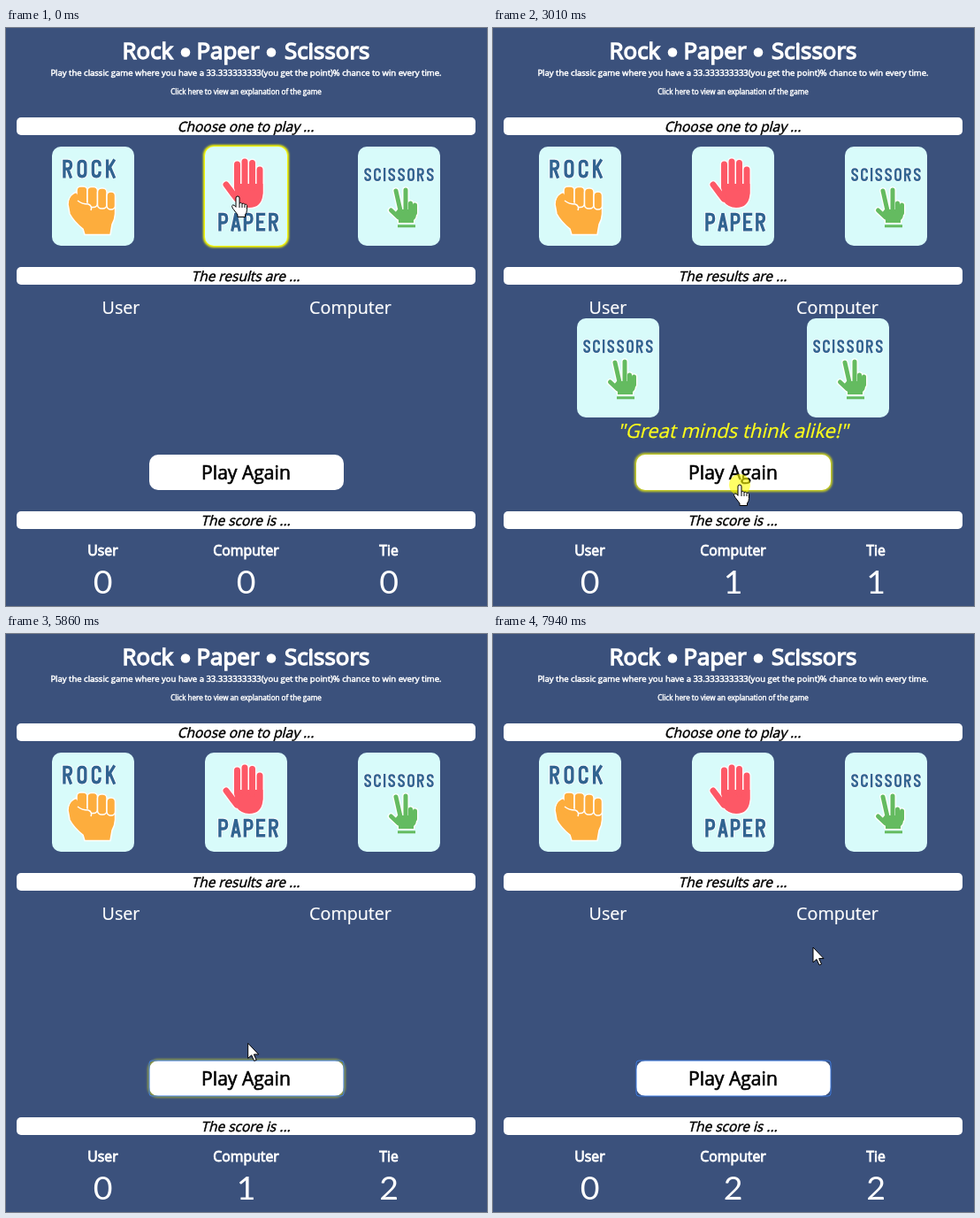
Recreate the animation shown at these times as an HTML page. Size 544 by 653 pixels, loop 8 s.

```html
<!DOCTYPE html>
<html lang="en">
<head>
<meta charset="utf-8">
<title>Rock Paper Scissors</title>
<style>
html, body { margin: 0; width: 100%; height: 100%; overflow: hidden; background: #3b517c; }
svg { display: block; font-family: "Open Sans", "Noto Sans", sans-serif; }
text { fill: #fff; text-anchor: middle; }
.left { text-anchor: start; }
.strong { stroke: #fff; stroke-width: .055em; }
.plain { stroke: #fff; stroke-width: .012em; }
.ink { fill: #000; stroke: #000; stroke-width: .03em; }
.cheer { fill: #ffff1a; stroke: #ffff1a; stroke-width: .01em; }
.digit { font: 37.5px Lato, sans-serif; }
</style>
</head>
<body>
<svg id="stage" width="544" height="653" viewBox="0 0 544 653">
  <defs>
    <filter id="soft" x="-20%" y="-20%" width="140%" height="140%"><feGaussianBlur stdDeviation=".8"/></filter>
    <filter id="halo" x="-20%" y="-20%" width="140%" height="140%"><feGaussianBlur stdDeviation="1.5"/></filter>
  </defs>
</svg>
<script>
const LOOP = 8000;
const CARD = { w: 93, h: 112 };
const stage = document.getElementById('stage');

// Condensed card lettering on a 12 x 22 grid
const glyphs = {
  R: 'M2 22V2H6Q10 2 10 6.5T6 11H2M6 11L10 22',
  O: 'M2 6Q2 2 6 2T10 6V16Q10 20 6 20T2 16Z',
  C: 'M10 8V6Q10 2 6 2T2 6V16Q2 20 6 20T10 16V14',
  K: 'M2 0V22M10.5 0L3 12M5 9L10.5 22',
  P: 'M2 22V2H6Q10 2 10 7T6 12H2',
  A: 'M1.5 22L6 1L10.5 22M3 16H9',
  E: 'M11 2H2V20H11M2 11H9',
  S: 'M10 7V6Q10 2 6 2T2 6Q2 9 6 11T10 16Q10 20 6 20T2 16V15',
  I: 'M2 0V22'
};

function lettering(word, x, y, scale, gap) {
  let pen = 0, paths = '';
  for (const letter of word) {
    paths += `<path d="${glyphs[letter]}" transform="translate(${pen} 0)"/>`;
    pen += (letter === 'I' ? 4 : 12) + gap / scale;
  }
  const layer = (color, width) => `<g stroke="${color}" stroke-width="${width}">${paths}</g>`;
  return `<g fill="none" transform="translate(${x} ${y}) scale(${scale})">${layer('#fff', 5.4)}${layer('#316491', 3.5)}</g>`;
}

// A hand made of thick round strokes over a filled palm, with a white rim
function hand(color, palm, fingers, width) {
  const layer = (tone, rim) => `<g stroke="${tone}" stroke-linecap="round" stroke-linejoin="round">
    <path d="${palm}" fill="${tone}" stroke-width="${rim}"/>
    <path d="${fingers}" fill="none" stroke-width="${width + rim}"/></g>`;
  return layer('#fff', 2.6) + layer(color, 0);
}

const knuckles = [[28, 45, 12, 22], [40, 45.5, 11.5, 23], [51.5, 47, 10.5, 23], [62, 51, 9.5, 20]]
  .map(([x, y, w, h]) => `<rect x="${x}" y="${y}" width="${w}" height="${h}" rx="4.5"/>`).join('');

const art = {
  rock: lettering('ROCK', 12, 14.5, .96, 4.7) +
    `<g fill="#fdad3d" stroke="#fff" stroke-width="1.5" stroke-linejoin="round">
      <path d="M18 65Q19 54 28 51L42 58H71.5V76Q71 83 68 88L66 99.5H37L35 93Q25 85 20 76Z"/>${knuckles}
      <path d="M19 63Q21 53 28 53Q32 62 41 64Q46 66 44 71Q40 74 34 72Z" stroke="none"/>
      <path d="M29 61Q34 65 41 65Q46 67 44 72" fill="none"/></g>`,
  paper: hand('#fd5866', 'M33 42H65.5V54Q64 69 50 69Q41 69 35 61Z',
    'M36.5 20V46M45 17V46M53.5 18.5V46M62 26V52M24 43L36 59', 7) +
    lettering('PAPER', 15, 74.5, .96, 2.7),
  scissors: lettering('SCISSORS', 7, 24, .69, 2.6) +
    hand('#64bb60', 'M45 71H66V76Q66 81 63 83V86H46V82L41 76Z',
      'M43 50L48 72M54 49V72M59.5 64V72M64.5 66V75M37.5 72L46 80', 5) +
    '<rect x="45" y="88.3" width="20" height="3" fill="#64bb60"/>'
};

const add = (markup, parent = stage) => {
  parent.insertAdjacentHTML('beforeend', markup);
  return parent.lastElementChild;
};
const text = (content, x, y, size, cls) =>
  add(`<text x="${x}" y="${y}" font-size="${size}" class="${cls}">${content}</text>`);
const slanted = (content, y, size, cls) =>
  add(`<text transform="translate(271 ${y}) skewX(-14)" font-size="${size}" class="${cls}">${content}</text>`);
const glow = (x, y, w, h, spread, filter) =>
  add(`<rect x="${x - spread}" y="${y - spread}" width="${w + 2 * spread}" height="${h + 2 * spread}"
    rx="${10 + spread}" fill="#ff0" filter="url(#${filter})" opacity="0"/>`);
const show = (node, on) => node.setAttribute('visibility', on ? 'visible' : 'hidden');

function card(x, y, kinds) {
  const group = add(`<g transform="translate(${x} ${y})"><rect width="${CARD.w}" height="${CARD.h}" rx="10" fill="#d8fbfa"/></g>`);
  const faces = {};
  for (const kind of kinds) faces[kind] = add(`<g role="img" aria-label="${kind}">${art[kind]}</g>`, group);
  return {
    set(kind) {
      show(group, kind);
      for (const k in faces) faces[k].setAttribute('display', k === kind ? 'inline' : 'none');
    }
  };
}

// Heading
text('Rock', 131.5, 35, 25.9, 'strong left');
text('Paper', 215.5, 35, 25.9, 'strong left');
text('Scissors', 315, 35, 25.9, 'strong left');
for (const x of [203, 300]) add(`<circle cx="${x}" cy="27.5" r="5.3" fill="#fff"/>`);
text('Play the classic game where you have a 33.333333333(you get the point)% chance to win every time.', 271.5, 54, 9.52, 'strong');
text('Click here to view an explanation of the game', 271.5, 75, 8.1, 'strong');

for (const [y, label] of [[101, 'Choose one to play ...'], [270, 'The results are ...'], [546, 'The score is ...']]) {
  add(`<rect x="12" y="${y}" width="519" height="20" rx="5" fill="#fff"/>`);
  slanted(label, y + 16, 15.5, 'ink');
}

// Things that react to the pointer
const targets = [
  { x: 52, y: 134, ...CARD, kind: 'rock', strength: .8 },
  { x: 225, y: 134, ...CARD, kind: 'paper', strength: 1 },
  { x: 398, y: 134, ...CARD, kind: 'scissors', strength: 1 },
  { x: 162, y: 482, w: 220, h: 40, strength: .72 }
];
for (const t of targets) {
  t.glow = glow(t.x, t.y, t.w, t.h, 2, 'soft');
  if (t.kind) card(t.x, t.y, [t.kind]).set(t.kind);
}
add('<rect x="162" y="482" width="220" height="40" rx="10" fill="#fff"/>');
text('Play Again', 271.5, 510, 21.1, 'ink');
const focusRing = add('<rect x="162" y="482" width="220" height="40" rx="3" fill="none" stroke="#3c7be0"/>');

// Results and score
text('User', 130, 323, 19.7, 'plain');
text('Computer', 389.5, 323, 19.7, 'plain');
const winnerGlow = glow(355, 328, CARD.w, CARD.h, 3, 'halo');
const kinds = Object.keys(art);
const userCard = card(95, 328, kinds);
const computerCard = card(355, 328, kinds);
const message = slanted('"Great minds think alike!"', 463, 22.1, 'cheer');

const digits = [['User', 109.5], ['Computer', 271.5], ['Tie', 433]].map(([label, x]) => {
  text(label, x, 596, 15.8, 'strong');
  return text('0', x, 638.5, 37.5, 'digit');
});

// Pointer
const ripple = add('<circle r="12" fill="#ff0" fill-opacity=".6"/>');
const pointer = add('<path fill="#fff" stroke="#000" stroke-linejoin="round"/>');
const shapes = {
  hand: 'M-2 2a2 2 0 0 1 4 0v6q1.5-1.5 3 .5q1.5-1 3 .8q2-.8 2.5 1.2v5q0 3-2 5.5v2.5h-8.5v-2.5l-5-6.5q-2.5-3.5-.5-4.5q1.5-.7 3.5 2.3zM2 8v5M5 9v4M8 10v3',
  arrow: 'M0 0V17L4 13.5L7 20L9.5 19L6.7 12.6H12Z'
};

const rounds = [
  { from: 300, to: 1230, user: 'paper', computer: 'scissors' },
  { from: 2070, to: 3240, user: 'scissors', computer: 'scissors' },
  { from: 4860, to: 5780, user: 'rock', computer: 'rock' },
  { from: 6400, to: 7860, user: 'paper', computer: 'scissors' }
];
const clicks = [70, 1000, 1840, 3010, 4630, 5550, 6170, 7630];
const route = [
  [0, 262, 190], [330, 262, 190], [830, 270, 490], [1230, 270, 490], [1540, 444, 244],
  [1690, 448, 205], [2070, 448, 205], [2460, 279, 516], [3240, 279, 516], [3640, 113, 183],
  [4700, 113, 183], [4960, 203, 534], [5050, 203, 534], [5400, 272, 519], [5780, 272, 519],
  [6090, 282, 184], [6470, 282, 184], [6540, 350, 190], [6630, 350, 190], [6710, 445, 200],
  [7090, 445, 200], [7480, 275, 511], [7790, 275, 511], [7940, 362, 354], [LOOP, 362, 354]
];

function slope(i, axis) {
  const a = route[i - 1], b = route[i], c = route[i + 1];
  if (!a || !c || a[1] === b[1] || b[1] === c[1]) return 0;
  return (c[axis] - a[axis]) / (c[0] - a[0]);
}

// Cubic Hermite path through the route, at rest wherever the pointer pauses
function position(t) {
  t = Math.max(0, t);
  const i = Math.max(0, route.findIndex(p => p[0] > t) - 1);
  const a = route[i], b = route[i + 1], span = b[0] - a[0], s = (t - a[0]) / span;
  const blend = s * s * (3 - 2 * s);
  return [1, 2].map(axis => a[axis] + (b[axis] - a[axis]) * blend +
    span * (slope(i, axis) * s * (1 - s) ** 2 - slope(i + 1, axis) * s * s * (1 - s)));
}

const inside = (b, [x, y]) => x >= b.x && x <= b.x + b.w && y >= b.y && y <= b.y + b.h;

// Share of the last moments spent over a target gives a soft fade
function hoverLevel(target, t) {
  let hits = 0;
  for (let k = 0; k < 5; k++) hits += inside(target, position(t - k * 15));
  return hits / 5;
}

function render(t) {
  const at = position(t);
  const place = `translate(${at[0].toFixed(2)} ${at[1].toFixed(2)})`;
  const over = targets.some(target => inside(target, at));
  pointer.setAttribute('d', over ? shapes.hand : shapes.arrow);
  pointer.setAttribute('transform', place);
  ripple.setAttribute('transform', place);
  show(ripple, clicks.some(c => t >= c && t < c + 65));
  for (const target of targets) target.glow.setAttribute('opacity', target.strength * hoverLevel(target, t));

  const played = rounds.filter(r => t >= r.from);
  const last = played[played.length - 1];
  const active = last && t < last.to ? last : null;
  const tie = r => r.user === r.computer;
  userCard.set(active && active.user);
  computerCard.set(active && active.computer);
  show(message, active && tie(active));
  winnerGlow.setAttribute('opacity', active && !tie(active) ? 1 : 0);
  show(focusRing, last && !active);

  const ties = played.filter(tie).length;
  [0, played.length - ties, ties].forEach((n, i) => { digits[i].textContent = n; });
}

const start = performance.now();
function tick() {
  render((performance.now() - start) % LOOP);
  requestAnimationFrame(tick);
}
tick();
</script>
</body>
</html>
```
